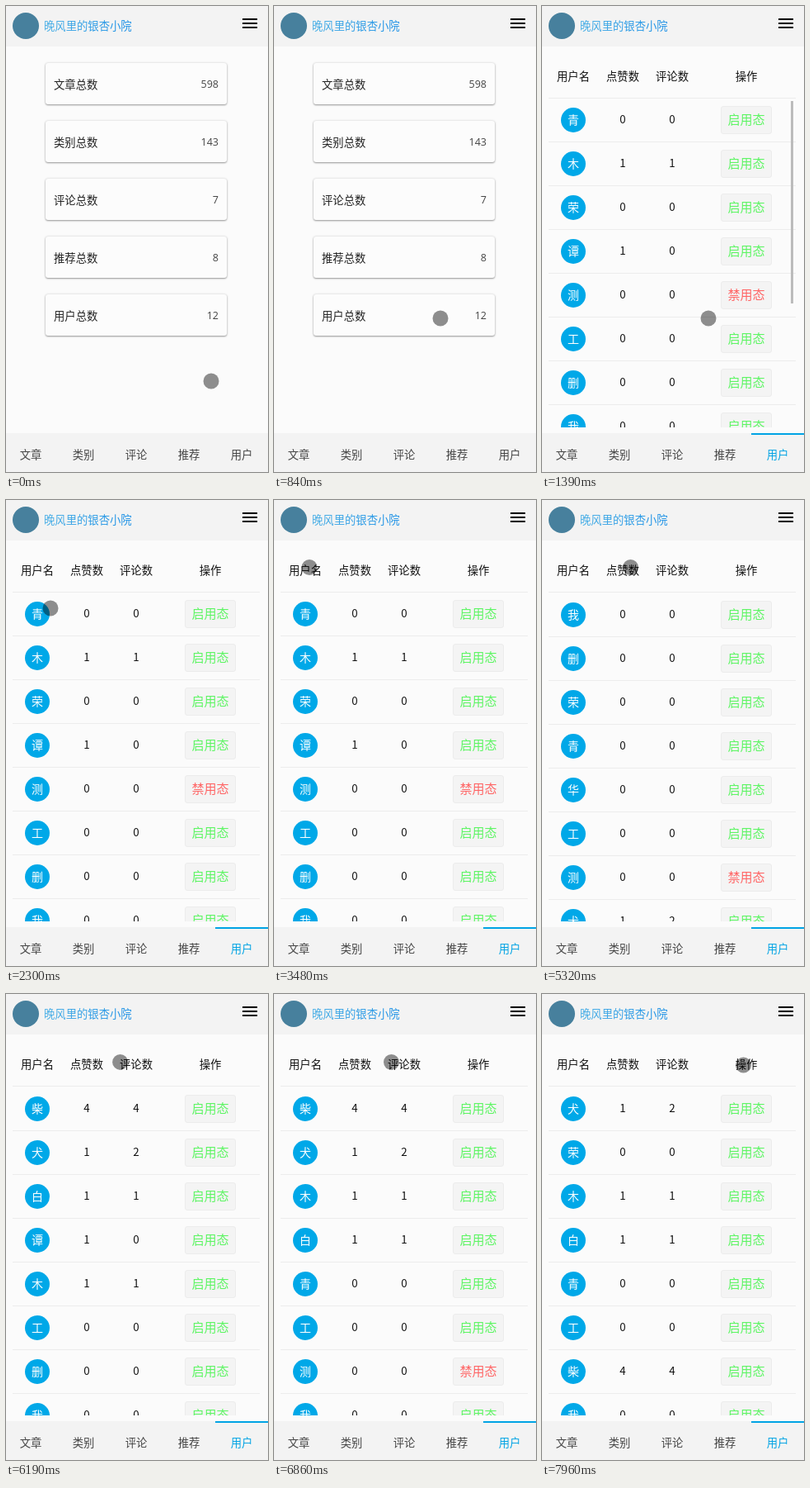
These frames come from a looping animation (318x564 px, 8 s). An HTML page:

```html
<!DOCTYPE html>
<html lang="zh-CN">
<head>
<meta charset="utf-8">
<title>后台管理</title>
<style>
html, body { margin: 0; width: 100%; height: 100%; overflow: hidden; background: #fbfbfb; }
body { position: relative; font: 13.33px/20px "Open Sans", "Noto Sans CJK SC", "Noto Sans CJK JP", sans-serif; color: #222; }
div { position: absolute; box-sizing: border-box; white-space: nowrap; }
.page { left: 0; top: 0; width: 318px; height: 564px; overflow: hidden; }
.bar { left: 0; width: 318px; background: #f3f3f3; }
.mid { width: 100px; height: 20px; text-align: center; }
.digit { font-family: "Noto Sans CJK SC", "Noto Sans CJK JP", sans-serif; margin-top: -1px; }
.logo { left: 8px; top: 8px; width: 32px; height: 32px; border-radius: 50%; background: #47809d; }
.title { left: 46px; top: 14px; font-weight: 500; color: transparent; background: linear-gradient(90deg, #4cb0e6, #1a8fe6); -webkit-background-clip: text; background-clip: text; }
.menu { left: 287px; width: 18px; height: 2px; background: #000; }
.card { left: 48px; width: 220px; height: 50px; border-radius: 3px; background: #fcfcfc; box-shadow: 0 1px 2px rgba(0,0,0,.36), 0 0 3px rgba(0,0,0,.14); }
.card div { top: 16px; }
.label { left: 10px; }
.count { right: 10px; font-size: 12.5px; color: #444; }
.table { left: 0; top: 0; width: 318px; height: 510px; overflow: hidden; }
.table .mid { color: #111; }
.line { left: 8px; width: 300px; height: 1px; background: #ececec; }
.row { left: 0; width: 318px; height: 53px; }
.avatar { left: 23px; top: 11px; width: 30px; height: 30px; border-radius: 50%; background: #00a8e8; color: #fff; font-size: 14px; font-weight: 500; line-height: 30px; text-align: center; }
.state { left: 217px; top: 9px; width: 62px; height: 34px; border: 1px solid #ececec; border-radius: 3px; background: #f4f4f4; font-size: 15px; line-height: 30px; text-align: center; }
.scroll { left: 302px; top: 115px; width: 3px; height: 245px; background: #bcbcbc; }
.active { left: 254px; top: 517px; width: 64px; height: 2px; background: #00a3e4; }
.pointer { left: -9.5px; top: -9.5px; width: 19px; height: 19px; border-radius: 50%; background: rgba(0,0,0,.44); }
</style>
</head>
<body>
<script>
const LOOP = 8000, STEP = 135, OPEN = 1390;

const byName = '白测柴工华木青犬荣删谭我';
const votes = { 白: [1, 1], 柴: [4, 4], 木: [1, 1], 犬: [1, 2], 谭: [1, 0] };
const users = [...'青木荣谭测工删我华白柴犬'].map(name => {
  const [likes, comments] = votes[name] || [0, 0];
  return { name, likes, comments, rank: byName.indexOf(name), on: name === '测' ? 0 : 1 };
});

// each column is clicked twice: ascending, then descending
const columns = ['rank', 'likes', 'comments', 'on'];
const clicks = [4010, 4620, 5320, 5890, 6430, 6860, 7560, 7960];

// pointer strokes: start, end, target x, y
const strokes = [
  [430, 840, 201.5, 377.5],
  [1670, 1910, 177.5, 309.5],
  [2060, 2300, 53.5, 130.5],
  [2450, 2600, 42.5, 81],
  [4900, 5020, 80, 81],
  [5170, 5170, 107, 81],
  [6040, 6310, 142, 82],
  [7130, 7410, 244, 85.5]
];

// unstable quicksort: one median-of-three partition, then both ends
function quickSort(list, cmp) {
  const a = [...list], last = a.length - 1, half = a.length >> 1;
  const swap = (i, j) => { [a[i], a[j]] = [a[j], a[i]]; };
  let low = 1, high = last, [p, q, r] = [a[0], a[last], a[half]];
  if (cmp(p, q) > 0) [p, q] = [q, p];
  if (cmp(p, r) >= 0) [p, q, r] = [r, p, q];
  else if (cmp(q, r) > 0) [q, r] = [r, q];
  a[half] = a[1];
  a[0] = p;
  a[1] = q;
  a[last] = r;
  for (let i = 2; i < high; i++) {
    if (cmp(a[i], q) > 0) {
      do high--; while (high > i && cmp(a[high], q) > 0);
      if (high === i) break;
      swap(i, high);
    }
    if (cmp(a[i], q) < 0) swap(i, low++);
  }
  return [...a.slice(0, low).sort(cmp), ...a.slice(low, high), ...a.slice(high).sort(cmp)];
}

const orders = [users];
clicks.forEach((_, i) => {
  const key = columns[i >> 1], sign = i % 2 ? -1 : 1;
  orders.push(quickSort(orders[i], (a, b) => sign * (a[key] - b[key])));
});

function add(parent, cls, text = '', style = {}) {
  const el = document.createElement('div');
  el.className = cls;
  el.textContent = text;
  Object.assign(el.style, style);
  parent.appendChild(el);
  return el;
}
const px = n => n + 'px';
const mid = (parent, x, y, text = '', cls = '') =>
  add(parent, 'mid ' + cls, text, { left: px(x - 50), top: px(y - 10) });

// header
const body = document.body;
add(body, 'bar', '', { top: 0, height: '49px' });
add(body, 'logo');
add(body, 'title', '晚风里的银杏小院');
for (let i = 0; i < 3; i++) add(body, 'menu', '', { top: px(15 + 5 * i) });

// totals
const names = ['文章', '类别', '评论', '推荐', '用户'];
const totals = add(body, 'page');
[598, 143, 7, 8, 12].forEach((n, i) => {
  const card = add(totals, 'card', '', { top: px(69 + 70 * i) });
  add(card, 'label', names[i] + '总数');
  add(card, 'count', n);
});

// user table
const list = add(body, 'page');
const table = add(list, 'table');
mid(table, 38, 85, '用户名');
mid(table, 98, 85, '点赞数');
mid(table, 158, 85, '评论数');
mid(table, 248, 85, '操作');
add(table, 'line', '', { top: '111px' });
const rows = Array.from({ length: 8 }, () => {
  const box = add(table, 'row');
  add(box, 'line', '', { top: '52px' });
  return {
    box,
    avatar: add(box, 'avatar'),
    likes: mid(box, 98, 26, '', 'digit'),
    comments: mid(box, 158, 26, '', 'digit'),
    state: add(box, 'state')
  };
});
const scroll = add(list, 'scroll');

// footer
add(body, 'bar', '', { top: '517px', height: '47px' });
const tabs = names.map((s, i) => mid(body, 30 + 64 * i, 543, s));
tabs.forEach(tab => { tab.style.color = '#444'; });
const active = add(body, 'active');
const pointer = add(body, 'pointer');

function fill(n) {
  rows.forEach((row, i) => {
    const user = orders[n][i];
    row.box.style.top = px(112 + (n > 0) + 53 * i);
    row.avatar.textContent = user.name;
    row.likes.textContent = user.likes;
    row.comments.textContent = user.comments;
    row.state.textContent = user.on ? '启用态' : '禁用态';
    row.state.style.color = user.on ? '#5cf562' : '#ff6464';
  });
}

// progress in equal jumps, the first at start and the last at end
function progress(t, start, end) {
  if (t < start) return 0;
  if (t >= end) return 1;
  const gaps = Math.max(1, Math.round((end - start) / STEP));
  return (1 + Math.floor((t - start) / (end - start) * gaps)) / (gaps + 1);
}

function place(t) {
  let x = 248.5, y = 453.5;
  for (const [start, end, toX, toY] of strokes) {
    const k = 1 - (1 - progress(t, start, end)) ** 2;
    x += (toX - x) * k;
    y += (toY - y) * k;
  }
  return `translate(${x}px, ${y}px)`;
}

let shown;
function draw(t) {
  const open = t >= OPEN;
  const n = clicks.filter(c => c <= t).length;
  totals.style.display = open ? 'none' : '';
  list.style.display = active.style.display = open ? '' : 'none';
  tabs[4].style.color = open ? '#00a3e4' : '#444';
  if (n !== shown) fill(shown = n);
  scroll.style.opacity = 1 - progress(t, 1670, 1910);
  pointer.style.transform = place(t);
}

const start = performance.now();
function tick() {
  draw((performance.now() - start) % LOOP);
  requestAnimationFrame(tick);
}
tick();
</script>
</body>
</html>
```
